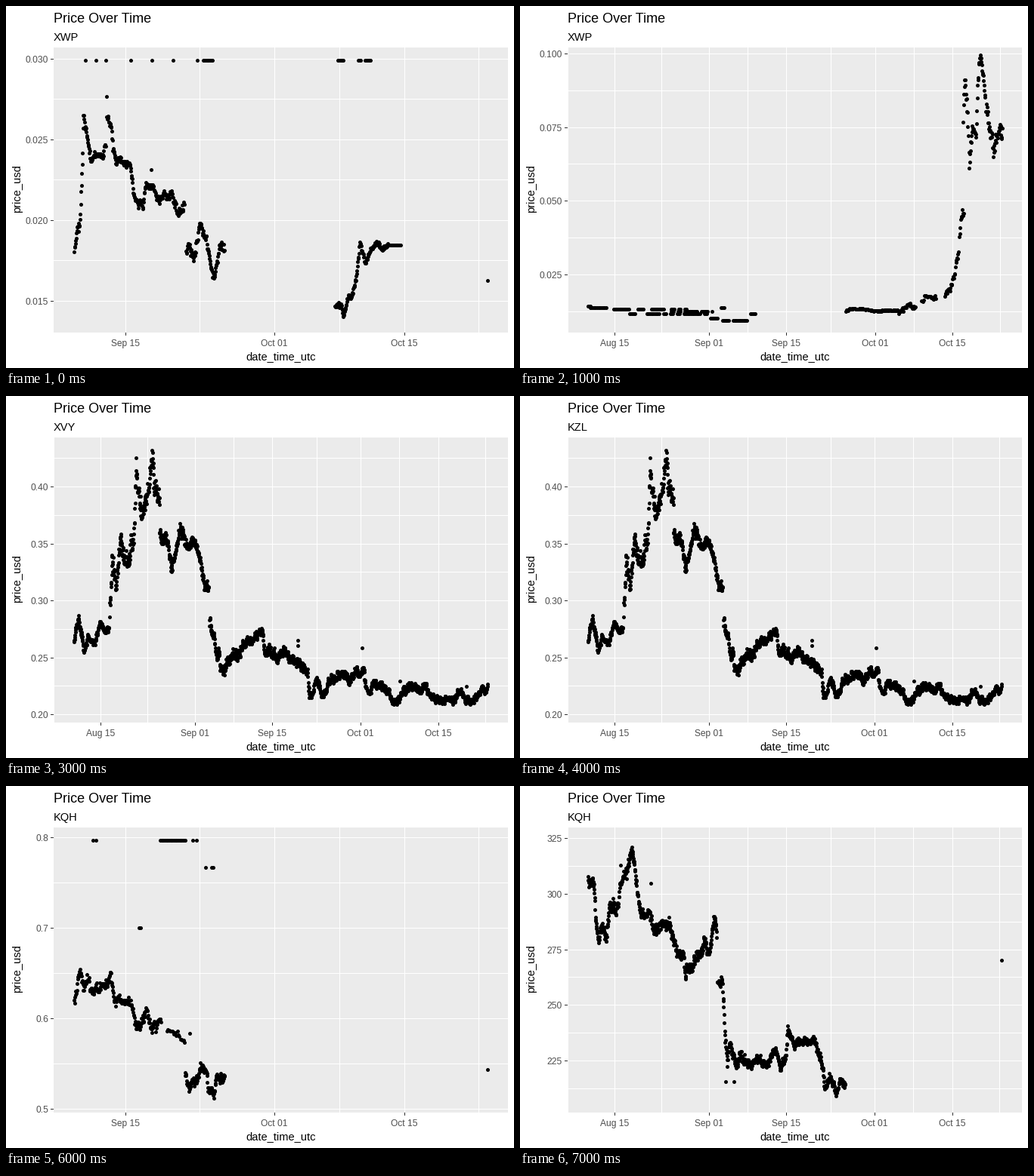
A matplotlib script that plays this animation: 672 by 480 pixels, repeating every 8000 ms.

```python
import numpy as np
import matplotlib.pyplot as plt
from matplotlib.animation import FuncAnimation
from matplotlib.patches import Rectangle

W, H = 672, 480
LEFT, RIGHT, TOP, BOTTOM = 63, 664, 55, 433
GREY = "#4d4d4d"
plt.rcParams["font.family"] = "Liberation Sans"

fig = plt.figure(figsize=(W / 96, H / 96), dpi=96, facecolor="white")
ax = fig.add_axes([0, 0, 1, 1])
ax.set(xlim=(0, W), ylim=(H, 0))
ax.axis("off")


def label(x, y, text, px, color="black", **kw):
    return ax.text(x, y, text, fontsize=px * 0.75, color=color,
                   va="baseline", rotation_mode="anchor", **kw)


def stroke(x0, y0, x1, y1, color):
    """One-pixel line; half-integer coordinates fill whole pixels."""
    return ax.plot([x0, x1], [y0, y1], color=color, lw=0.75, zorder=2,
                   snap=False, solid_capstyle="butt")[0]


def walk(rng, density, wobble, *path):
    """Evenly timed points: a trend through key points plus a random walk."""
    xs, ys = np.array(path, float).T
    x = np.linspace(xs[0], xs[-1], int((xs[-1] - xs[0]) * density))
    drift, noise = 0, []
    for step, spike in rng.normal(size=(x.size, 2)):
        drift = 0.85 * drift + 0.5 * step
        noise.append(0.8 * drift + 0.4 * spike)
    y = np.interp(x, xs, ys) + wobble * np.clip(noise, -1.8, 1.8)
    return np.column_stack([x, y])


def row(rng, y, start, end, fill=1):
    """Points on one level, with random gaps when fill is below one."""
    x = np.arange(start, end + 0.5, 1.5)
    keep = np.repeat(rng.random(x.size // 3 + 1), 3)[:x.size] < fill
    return np.column_stack([x[keep], np.full(keep.sum(), y)])


def ambient(rng):
    return [
        walk(rng, 2, 5, (90, 324), (94, 294), (97, 297), (101, 205),
             (102, 142), (108, 180), (112, 206), (117, 197), (128, 203),
             (132, 184)),
        walk(rng, 2, 5, (133, 148), (138, 160), (145, 212), (152, 208),
             (158, 215), (164, 215), (171, 264), (181, 266), (184, 234),
             (203, 254), (208, 244), (220, 252), (228, 276), (236, 264)),
        walk(rng, 2, 6, (238, 324), (248, 331), (256, 295), (265, 314),
             (271, 358), (275, 365), (283, 318), (289, 326)),
        walk(rng, 2, 3, (435, 400), (443, 398), (446, 414), (453, 381),
             (457, 383), (463, 360), (468, 315), (475, 341), (486, 316),
             (498, 321), (505, 318)),
        row(rng, 317, 505, 522),
        row(rng, 72, 261, 273), row(rng, 72, 439, 496, 0.5),
        [(x, 72) for x in (105, 119, 132, 165, 193, 221, 253)],
        [(133, 120), (192, 217), (637, 364)]]


def surge(rng):
    return [
        row(rng, 398, 90, 93), row(rng, 400, 93, 114),
        row(rng, 402, 124, 144), row(rng, 402, 151, 220, 0.65),
        row(rng, 408, 145, 252, 0.65), row(rng, 405, 200, 255, 0.6),
        row(rng, 400, 208, 282, 0.2), row(rng, 414, 252, 262, 0.8),
        row(rng, 417, 264, 300, 0.8), row(rng, 408, 305, 312),
        walk(rng, 1.5, 0.6, (431, 405), (437, 401), (452, 402), (470, 404),
             (500, 404)),
        walk(rng, 1.3, 3, (500, 404), (508, 403), (512, 397), (523, 395)),
        walk(rng, 1.1, 3, (531, 392), (541, 385), (550, 384)),
        walk(rng, 1.6, 4, (562, 384), (569, 378), (574, 358), (580, 333)),
        walk(rng, 1.8, 8, (581, 313), (583, 285), (587, 262)),
        walk(rng, 1.9, 10, (586, 150), (588, 90), (591, 135), (594, 215),
             (598, 172), (603, 172), (607, 82), (612, 85), (617, 140),
             (626, 184), (634, 162), (638, 162))]


def decline(rng):
    return [
        walk(rng, 3.3, 4, (90, 325), (95, 293), (103, 337), (110, 317),
             (116, 328), (124, 306), (136, 307)),
        walk(rng, 3.2, 12, (137, 298), (140, 230), (147, 246), (151, 182),
             (160, 232), (166, 192), (169, 180), (172, 100), (179, 165),
             (193, 88), (203, 150)),
        walk(rng, 3.3, 6, (203, 180), (206, 197), (211, 185), (219, 230),
             (230, 177), (242, 195), (250, 197), (258, 222), (262, 250),
             (268, 253)),
        walk(rng, 3.3, 8, (269, 296), (277, 328), (287, 368), (294, 342),
             (310, 340)),
        walk(rng, 3.3, 5, (310, 336), (319, 325), (337, 311), (343, 335),
             (352, 337), (357, 348), (368, 340), (399, 366), (401, 398),
             (410, 378), (418, 392), (432, 372), (452, 375), (474, 362)),
        walk(rng, 3.3, 4, (474, 378), (477, 394), (486, 382), (500, 387),
             (513, 406), (532, 385), (556, 388), (564, 399), (590, 404),
             (602, 392), (614, 410), (626, 389), (637, 389)),
        [(172, 82), (193, 72), (386, 324), (386, 331), (471, 334),
         (521, 378), (609, 385)]]


def plateaus(rng):
    return [
        walk(rng, 2, 6, (90, 286), (94, 270), (98, 245), (102, 270),
             (108, 254), (112, 280), (121, 262), (130, 262), (138, 250),
             (143, 284), (152, 277), (164, 279), (172, 318), (186, 304),
             (191, 322), (205, 320)),
        walk(rng, 0.8, 4, (213, 323), (226, 324), (236, 342)),
        walk(rng, 2.2, 6, (237, 380), (241, 396), (253, 387), (257, 373),
             (264, 380), (269, 410), (275, 411), (278, 389), (289, 384)),
        row(rng, 72, 204, 237), row(rng, 108, 272, 274),
        row(rng, 188, 176, 178),
        [(x, 72) for x in (115, 119, 247, 252)],
        [(264, 108), (243, 328), (637, 376)]]


def steps(rng):
    return [
        walk(rng, 3, 7, (90, 126), (97, 136), (104, 208), (109, 187),
             (114, 197), (118, 162), (130, 157), (133, 128), (142, 118),
             (147, 82), (152, 116), (161, 170), (171, 161), (176, 192),
             (187, 192), (197, 172), (205, 218), (216, 220), (219, 250),
             (226, 234), (238, 230)),
        walk(rng, 3, 7, (238, 222), (243, 208), (250, 216), (257, 178),
             (260, 195)),
        walk(rng, 2.5, 7, (261, 255), (267, 258), (270, 305), (274, 365),
             (277, 342), (286, 368), (293, 354), (305, 370)),
        walk(rng, 3, 4.5, (305, 371), (312, 360), (330, 367), (338, 346),
             (344, 374), (352, 361), (354, 325), (361, 343), (378, 335),
             (389, 338), (398, 362), (403, 401), (411, 383), (418, 412),
             (424, 390), (430, 394)),
        [(133, 105), (173, 129), (272, 392), (283, 392), (637, 231)]]


def ticks(start, per_day, days, names):
    """Date tick positions, and the minor lines between and beside them."""
    major = [start + per_day * d for d in days]
    half = (major[1] - major[0]) / 2
    minor = [major[0] - half, *np.convolve(major, [0.5, 0.5], "valid"),
             major[-1] + half]
    return list(zip(np.round(major), names)), np.round(minor)


def short_axis():
    return ticks(158, 12.3, (0, 16, 30), ("Sep 15", "Oct 01", "Oct 15"))


def long_axis(start, per_day):
    return ticks(start, per_day, (0, 17, 31, 47, 61),
                 ("Aug 15", "Sep 01", "Sep 15", "Oct 01", "Oct 15"))


def panel(seed, series, axis, y_first, y_step, y_labels):
    """Build one chart and return its artists, all hidden."""
    dates, minor = axis
    parts = []
    for i in range(-1, 2 * len(y_labels)):
        y = int(y_first + i * y_step / 2) + 0.5
        if TOP < y < BOTTOM:
            parts.append(stroke(LEFT, y, RIGHT, y, "white"))
    for x in [*minor, *(x for x, _ in dates)]:
        if LEFT <= x < RIGHT:
            parts.append(stroke(x + 0.5, TOP, x + 0.5, BOTTOM, "white"))
    for i, text in enumerate(y_labels):
        y = int(y_first + i * y_step) + 0.5
        parts.append(stroke(LEFT - 4, y, LEFT, y, "#333333"))
        parts.append(label(56, y + 4.5, text, 12, GREY, ha="right"))
    for x, text in dates:
        parts.append(stroke(x + 0.5, BOTTOM, x + 0.5, BOTTOM + 4, "#333333"))
        parts.append(label(x, 451, text, 12, GREY, ha="center"))
    pts = np.round(np.vstack(series(np.random.default_rng(seed))))
    parts += ax.plot(pts[:, 0], pts[:, 1], "o", color="black", ms=3.75, mew=0,
                     antialiased=False, zorder=3)
    for p in parts:
        p.set_visible(False)
    return parts


ax.add_patch(Rectangle((LEFT, TOP), RIGHT - LEFT, BOTTOM - TOP, lw=0,
                       color="#ebebeb", zorder=1))
label(63, 22, "Price Over Time", 18)
subtitle = label(63, 46, "", 14.67)
label(363.5, 469, "date_time_utc", 14.67, ha="center")
label(19, 242, "price_usd", 14.67, ha="center", rotation=90)

panels = [
    panel(1, ambient, short_axis(), 70.4, 107,
          ("0.030", "0.025", "0.020", "0.015")),
    panel(2, surge, long_axis(125, 7.336), 63.2, 97.8,
          ("0.100", "0.075", "0.050", "0.025")),
    panel(3, decline, long_axis(125.2, 7.32), 120.5, 75.5,
          ("0.40", "0.35", "0.30", "0.25", "0.20")),
    panel(4, plateaus, short_axis(), 68.4, 120,
          ("0.8", "0.7", "0.6", "0.5")),
    panel(5, steps, long_axis(125.2, 7.32), 69.6, 73.7,
          ("325", "300", "275", "250", "225")),
]
codes = ["XWP", "XVY", "KZL", "KQH"]


def draw(i):
    # chart and subtitle advance in alternating seconds
    for k, parts in enumerate(panels):
        for p in parts:
            p.set_visible(k == (i + 1) // 2)
    subtitle.set_text(codes[i // 2])
    return []


anim = FuncAnimation(fig, draw, frames=8, interval=1000, repeat=True,
                     repeat_delay=0, blit=False)
plt.show()
```
